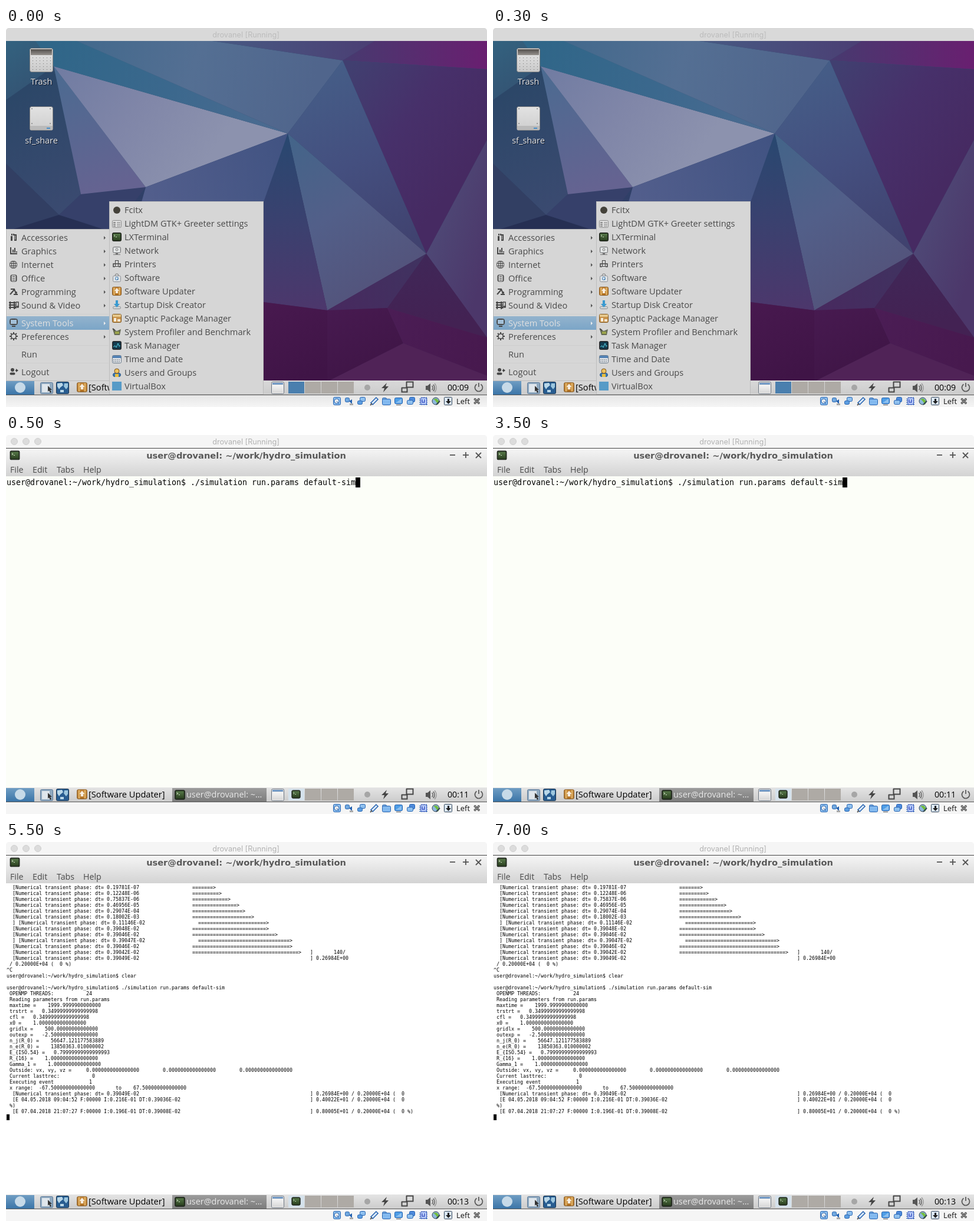
These frames come from a looping animation (816 by 643 pixels, 8000 ms). An HTML page with a canvas:

```html
<!DOCTYPE html>
<html lang="en">
<head>
<meta charset="utf-8">
<title>Desktop session</title>
<style>
  html, body { margin: 0; width: 100%; height: 100%; overflow: hidden; background: #fff; }
  canvas { display: block; }
</style>
</head>
<body>
<canvas id="stage" width="816" height="643"></canvas>
<script>
const ctx = document.getElementById('stage').getContext('2d');
const LOOP = 8000, TERMINAL_AT = 500, OUTPUT_AT = 5500;
const UI = '"Open Sans", "Noto Sans", sans-serif';
const HOST = 'drovanel';
const PROMPT = `user@${HOST}:~/work/hydro_simulation$ `;
const COMMAND = './simulation run.params default-sim';

// Drawing helpers
function rect(x, y, w, h, fill) {
  ctx.fillStyle = fill;
  ctx.fillRect(x, y, w, h);
}
function frame(x, y, w, h, color) {
  ctx.strokeStyle = color;
  ctx.lineWidth = 1;
  ctx.strokeRect(x + .5, y + .5, w - 1, h - 1);
}
function box(x, y, w, h, fill, edge, r = 2) {
  ctx.beginPath();
  ctx.roundRect(x + .5, y + .5, w - 1, h - 1, r);
  ctx.fillStyle = fill;
  ctx.fill();
  if (edge) {
    ctx.strokeStyle = edge;
    ctx.lineWidth = 1;
    ctx.stroke();
  }
}
function trace(pts) {
  ctx.beginPath();
  for (let i = 0; i < pts.length; i += 2) ctx.lineTo(pts[i], pts[i + 1]);
}
function poly(pts, fill) {
  trace(pts);
  ctx.closePath();
  ctx.fillStyle = fill;
  ctx.fill();
}
function line(pts, color, width = 1) {
  trace(pts);
  ctx.strokeStyle = color;
  ctx.lineWidth = width;
  ctx.stroke();
}
function disc(x, y, r, fill, edge) {
  ctx.beginPath();
  ctx.arc(x, y, r, 0, Math.PI * 2);
  if (fill) { ctx.fillStyle = fill; ctx.fill(); }
  if (edge) { ctx.strokeStyle = edge; ctx.lineWidth = 1; ctx.stroke(); }
}
function arc(x, y, r, a, b, color, width = 1) {
  ctx.beginPath();
  ctx.arc(x, y, r, a, b);
  ctx.strokeStyle = color;
  ctx.lineWidth = width;
  ctx.stroke();
}
function blend(x0, y0, x1, y1, ...colors) {
  const g = ctx.createLinearGradient(x0, y0, x1, y1);
  colors.forEach((c, i) => g.addColorStop(i / (colors.length - 1), c));
  return g;
}
const shade = (y0, y1, ...colors) => blend(0, y0, 0, y1, ...colors);
function text(s, x, y, color, { size = 14.6, align = 'left', family = UI, weight = 400 } = {}) {
  ctx.font = `${weight} ${size}px ${family}`;
  ctx.textAlign = align;
  ctx.fillStyle = color;
  ctx.fillText(s, x, y);
}
function mono(s, x, y, cell) {
  ctx.font = `${cell / .602}px "DejaVu Sans Mono", monospace`;
  ctx.textAlign = 'left';
  ctx.fillStyle = '#000';
  for (let i = 0; i < s.length; i++) if (s[i] !== ' ') ctx.fillText(s[i], x + i * cell, y);
}
function icon(draw, cx, cy, scale = 1) {
  ctx.save();
  ctx.translate(cx, cy);
  ctx.scale(scale, scale);
  draw();
  ctx.restore();
}

// Icons, centred on the origin
const DARK = '#464646', BLUE = '#2361b0', SKY = '#8fc0ee';

const glyph = {
  accessories() {
    rect(-5, -2, 3, 8, DARK); rect(-4, -6, 2, 3, DARK);
    rect(1, -5, 4, 11, DARK); rect(-1, -6, 2, 3, DARK); rect(2, -3, 1, 7, '#d6d6d6');
  },
  graphics() {
    line([-5, -6, -5, 5, 6, 5], DARK, 2);
    rect(-2, -2, 2, 5, DARK); rect(1, -5, 2, 8, DARK); rect(4, 1, 2, 2, DARK);
  },
  internet() {
    box(-7, -6, 13, 13, '#d6d6d6', DARK, 5);
    box(-4, -6, 7, 13, '#d6d6d6', DARK, 3);
    line([-.5, -6, -.5, 6], DARK);
    line([-6, -1.5, 5, -1.5], DARK); line([-6, 2.5, 5, 2.5], DARK);
  },
  office() {
    box(-6, -6, 12, 13, DARK, null, 3);
    box(-4, -5, 8, 11, '#d6d6d6', null, 1);
    for (const y of [-3, 0, 3]) rect(-2, y, 4, 1, DARK);
  },
  programming() {
    line([-6, 5, 1, -3], DARK, 2); line([-5, -4, 1, -4, 3, 1], DARK, 2);
    line([0, 5, 7, 5], DARK, 2); disc(4, 2, 2, DARK);
  },
  video() {
    for (const x of [-7, 0]) rect(x, -6, 2, 13, DARK);
    for (const y of [-5, -1, 3]) rect(-8, y, 11, 2, DARK);
    line([4, 4, 4, -5, 8, -5, 8, 3], DARK, 1.5);
    disc(3, 4, 2, DARK); disc(7, 3, 2, DARK);
  },
  system() {
    box(-7, -7, 14, 11, '#a3c0d8', DARK, 3); frame(-6, -6, 12, 9, DARK);
    rect(-3, 5, 6, 2, DARK);
  },
  preferences() {
    for (let i = 0; i < 8; i++) {
      const a = i * Math.PI / 4, c = Math.cos(a), s = Math.sin(a);
      line([c * 4, s * 4, c * 7, s * 7], DARK, 2);
    }
    disc(0, 0, 4.5, '#d6d6d6', DARK); disc(0, 0, 4, null, DARK);
  },
  logout() {
    disc(-2, -3, 3, DARK); box(-7, 1, 10, 5, DARK, null, 3);
    line([3, -2, 7, -2], DARK, 2); poly([4, -5, 8, -2, 4, 1], DARK);
  }
};

const app = {
  round() { disc(0, 0, 6, '#44423a'); },
  greeter() {
    box(-8, -6, 16, 13, '#e2e2e2', '#8a8a8a');
    for (const y of [-3, 0, 3]) { rect(-6, y, 4, 2, '#8c8c8c'); rect(0, y, 6, 2, '#aaa'); }
  },
  terminal() {
    box(-8, -8, 16, 15, '#273421', '#1b2018');
    rect(-6, -6, 12, 11, shade(-6, 5, '#567848', '#2b4120'));
    line([-5, -4, -3, -2.5, -5, -1], '#c5d5bb'); rect(-2, -1, 2, 1, '#c5d5bb');
  },
  network() {
    box(-7, -7, 14, 11, '#c9cdd0', '#777'); rect(-5, -5, 10, 7, '#e4e6e6');
    rect(-2, 4, 4, 2, '#777'); rect(-6, 6, 12, 1, '#777'); disc(0, -2, 2, null, '#777');
  },
  printer() {
    line([-3, 4, -6, 4, -6, -1, 6, -1, 6, 4, 3, 4], DARK, 1.5);
    frame(-3, -7, 6, 11, DARK);
  },
  store() {
    box(-7, -4, 14, 11, '#dfe2e5', '#8b8f94'); arc(0, -4, 3, Math.PI, 0, '#777');
    disc(0, 1, 3, '#5f92bd'); rect(-1, -1, 1, 4, '#fff'); rect(-2, 0, 4, 1, '#fff');
  },
  updater() {
    box(-8, -8, 16, 15, shade(-8, 7, '#c98a3c', '#b06f20'), '#87571d');
    rect(-6, -7, 3, 13, '#dbab60'); rect(3, -7, 3, 13, '#dbab60');
    poly([-4, -1, 0, -6, 4, -1, 2, -1, 2, 3, -2, 3, -2, -1], '#f7eee1');
  },
  disk() {
    box(-7, 2, 14, 5, '#cfd3d5', '#8d9194');
    poly([-2, -8, 2, -8, 2, -2, 5, -2, 0, 4, -5, -2, -2, -2], '#3a9ad0');
  },
  packages() {
    box(-8, -8, 16, 15, '#c8924a', '#80581f'); rect(-7, -7, 14, 4, '#e6c88c');
    rect(-5, -1, 4, 6, '#f5eddd'); rect(1, 1, 5, 4, '#f0e4cf');
  },
  profiler() {
    poly([-7, -5, 0, -2, 7, -5, 5, 5, -4, 5], '#666b54');
    rect(-3, -1, 7, 4, '#9ca54b'); line([-7, -6, -3, -3], '#444', 2);
  },
  tasks() {
    box(-8, -8, 16, 15, '#182630', '#333'); rect(-6, -6, 12, 11, '#153d51');
    line([-6, 2, -3, 0, -1, 3, 2, -4, 4, 1, 6, 0], '#55d1e3');
  },
  clock() {
    box(-8, -7, 16, 14, '#e4e6e9', '#68798a'); rect(-7, -6, 14, 4, '#5483b5');
    for (let i = 0; i < 8; i++) rect(-6 + i % 4 * 3, i < 4 ? 0 : 3, 2, 2, '#98a2ac');
  },
  users() {
    box(-7, 0, 14, 7, '#3679b8', '#214d80', 3);
    disc(0, -3, 4, '#edc15c', '#77501d'); rect(-3, 2, 6, 5, '#e9bd3a');
  },
  square() { rect(-8, -8, 16, 15, '#579bc7'); }
};

const SYSTEM_TOOLS = [
  ['Fcitx', 'round'], ['LightDM GTK+ Greeter settings', 'greeter'], ['LXTerminal', 'terminal'],
  ['Network', 'network'], ['Printers', 'printer'], ['Software', 'store'],
  ['Software Updater', 'updater'], ['Startup Disk Creator', 'disk'],
  ['Synaptic Package Manager', 'packages'], ['System Profiler and Benchmark', 'profiler'],
  ['Task Manager', 'tasks'], ['Time and Date', 'clock'], ['Users and Groups', 'users'],
  ['VirtualBox', 'square']
];
const MAIN_MENU = [
  ['Accessories', 'accessories', 356], ['Graphics', 'graphics', 379], ['Internet', 'internet', 402],
  ['Office', 'office', 425], ['Programming', 'programming', 448], ['Sound & Video', 'video', 471],
  ['System Tools', 'system', 501], ['Preferences', 'preferences', 524],
  ['Run', null, 554], ['Logout', 'logout', 584]
];

function wallpaper() {
  rect(0, 22, 816, 578, blend(0, 22, 120, 600, '#32607f', '#2f4068', '#452556'));
  const facets = [
    [[0, 22, 50, 22, 81, 65, 0, 122], blend(0, 22, 60, 110, '#33627f', '#345272')],
    [[0, 122, 81, 65, 127, 282, 90, 317, 0, 230], blend(0, 122, 90, 310, '#2c4768', '#3a4a70')],
    [[0, 230, 90, 317, 0, 345], '#323f63'],
    [[0, 345, 90, 317, 175, 345], '#262f53'],
    [[90, 317, 127, 282, 237, 270, 180, 345], '#36406a'],
    [[81, 65, 237, 270, 127, 282], blend(81, 65, 150, 280, '#4a6b91', '#656391')],
    [[81, 65, 478, 179, 237, 270], blend(90, 70, 330, 240, '#717ca2', '#8086a8', '#8c92ae')],
    [[50, 22, 120, 22, 478, 179, 81, 65], blend(70, 22, 478, 179, '#2f6688', '#3b688d', '#4d6b91')],
    [[120, 22, 350, 22, 571, 55, 478, 179], blend(120, 22, 510, 140, '#42698c', '#546f93', '#50658c')],
    [[350, 22, 625, 22, 571, 55], blend(350, 22, 620, 22, '#475a83', '#4b3f74')],
    [[625, 22, 816, 22, 816, 70, 571, 55], blend(580, 40, 816, 40, '#48396f', '#691f70')],
    [[571, 55, 816, 70, 816, 190, 713, 383], blend(580, 70, 790, 230, '#413f70', '#47306a', '#462a62')],
    [[571, 55, 713, 383, 478, 179], blend(540, 70, 680, 370, '#455d87', '#444f7f', '#40426f')],
    [[478, 179, 713, 383, 545, 479], blend(490, 190, 640, 430, '#446489', '#525f89', '#53547c')],
    [[478, 179, 545, 479, 437, 465, 437, 292], blend(478, 180, 490, 475, '#284870', '#3a416f', '#4c376c')],
    [[237, 270, 478, 179, 437, 295, 230, 295], blend(237, 270, 478, 190, '#525e8c', '#415382')],
    [[713, 383, 816, 190, 816, 525], blend(720, 370, 816, 400, '#4e4775', '#4c376a')],
    [[437, 465, 545, 479, 545, 600, 437, 600], blend(437, 465, 500, 600, '#48194f', '#3f1446')],
    [[545, 479, 713, 383, 647, 475], blend(560, 470, 700, 400, '#472a5f', '#403260')],
    [[713, 383, 816, 525, 647, 475], blend(713, 383, 720, 500, '#402758', '#432253')],
    [[545, 479, 647, 475, 674, 535, 545, 600], blend(545, 479, 600, 600, '#471a50', '#3f1546')],
    [[647, 475, 816, 525, 816, 590, 674, 535], blend(650, 480, 800, 580, '#4b1d55', '#47194e')],
    [[674, 535, 816, 590, 816, 600, 545, 600], '#502357']
  ];
  for (const [pts, fill] of facets) poly(pts, fill);
}

function desktopIcons() {
  box(40, 34, 40, 41, shade(34, 75, '#e6e6e6', '#c9c9c9'), '#858585', 3);
  rect(42, 36, 36, 10, shade(36, 46, '#54504d', '#94908c'));
  for (let i = 0; i < 30; i++) rect(45 + i % 6 * 6, 50 + Math.floor(i / 6) * 5, 1, 1, '#777');
  box(40, 133, 40, 41, shade(133, 174, '#e2e2e2', '#cecece'), '#858585', 3);
  rect(41, 166, 38, 7, '#bababa');
  rect(69, 169, 6, 2, '#468dc9');
  for (const [x, y] of [[44, 137], [75, 137], [44, 162], [75, 162]]) disc(x, y, 1, '#888');
  for (const [label, y] of [['Trash', 96], ['sf_share', 196]]) {
    const style = { size: 14.4, align: 'center' };
    text(label, 61, y + 1, '#101828', style);
    text(label, 60, y, '#e8e8e8', style);
  }
}

function menus() {
  const back = '#d6d6d6', ink = '#4a4a4a';
  rect(0, 341, 176, 258, back);
  frame(0, 341, 176, 258, '#bcbcbc');
  rect(1, 489, 174, 23, shade(489, 512, '#93b3cd', '#7ba5c7'));
  for (const y of [485, 538, 568]) rect(2, y, 172, 1, '#cecece');
  for (const [label, name, y] of MAIN_MENU) {
    const active = name === 'system';
    if (name) icon(glyph[name], 13, y - 1);
    text(label, 26, y + 5, active ? '#e0e0e0' : ink);
    if (y < 530) poly([166, y - 3, 169, y, 166, y + 3], active ? '#eee' : '#555');
  }
  rect(175, 294, 262, 328, back);
  frame(175, 294, 262, 328, '#bcbcbc');
  SYSTEM_TOOLS.forEach(([label, name], i) => {
    const y = 309 + 23 * i;
    icon(app[name], 188, y);
    text(label, 201, y + 5, ink);
  });
}

function tray(clock) {
  disc(613, 610, 5, '#a6a6a6');
  poly([646, 602, 637, 611, 642, 611, 640, 618, 649, 608, 644, 608], DARK);
  line([679, 600.5, 690.5, 600.5, 690.5, 609.5, 679.5, 609.5, 679.5, 600], DARK, 2);
  line([671, 610.5, 680.5, 610.5, 680.5, 617.5, 671.5, 617.5, 671.5, 610], DARK, 2);
  poly([712, 607, 715, 607, 720, 603, 720, 618, 715, 614, 712, 614], '#555');
  [4, 7, 10].forEach((r, i) => arc(719, 610.5, r + 1, -.75, .75, i < 2 ? '#555' : '#999', 1.4));
  text(clock, 749, 615, '#000', { size: 14.2, weight: 500 });
  arc(802, 610, 6.5, -1, Math.PI + 1, '#555', 1.7);
  line([802, 602, 802, 609], '#555', 1.7);
}

function panel(clock, open) {
  rect(0, 598, 816, 25, shade(598, 623, open ? '#e4e4e4' : '#d9d9d9', '#cbcbcb'));
  rect(0, 599, 48, 23, shade(599, 622, '#6f9dc3', '#3b75a8'));
  disc(24, 610, 9, '#c7dae8');

  box(58, 601, 22, 20, '#8fa9c0', '#5a7898');
  rect(61, 604, 13, 14, '#dfe6ec');
  poly([71, 607, 71, 617, 73, 615, 75, 619, 77, 618, 75, 614, 78, 614], '#333');
  box(85, 600, 22, 21, '#285d91', '#193550');
  poly([87, 603, 95, 602, 97, 606, 92, 610, 90, 613, 87, 608], '#b9d7e8');
  poly([99, 603, 105, 603, 105, 609, 102, 613, 98, 608], '#9cc6de');
  rect(92, 614, 6, 4, '#b9d7e8');

  icon(app.updater, 129, 610, 1.1);
  text('[Software Updater]', 140, 615, '#000', { weight: 500 });
  if (open) {
    rect(282, 599, 160, 23, shade(599, 622, '#9c9c9c', '#7c7c7c'));
    icon(app.terminal, 295, 611, 1.1);
    text(`user@${HOST}: ~...`, 306, 615, '#e9e9e9', { size: 14.4 });
  }
  box(450, 600, 22, 21, '#e9e9e9', '#6b7480');
  rect(452, 602, 18, 3, '#6c94c1');
  rect(452, 606, 18, 13, shade(606, 619, '#f4f4f4', '#d8d8d8'));
  for (let i = 0; i < 4; i++) rect(479 + i * 28, 600, 27, 20, '#aeaaa5');
  rect(479, 600, 27, 20, open ? '#d5e2ec' : '#4a7fae');
  if (open) icon(app.terminal, 492, 610, .95);
  tray(clock);
  rect(0, 622, 816, 1, '#555');
}

const status = [
  () => { box(-6, -7, 13, 14, SKY, BLUE); disc(0, 0, 4, '#eee', BLUE); line([0, 0, 4, 5], BLUE); },
  () => { box(-7, -6, 8, 8, '#72a9df', BLUE); poly([0, 0, 5, -3, 5, 5], BLUE); rect(1, 4, 6, 3, '#aaa'); },
  () => { box(-3, -7, 10, 8, SKY, BLUE); box(-7, -1, 9, 7, '#5d9ee0', BLUE); },
  () => { line([-5, 5, 5, -5], BLUE, 6); line([-4, 4, 4, -4], '#dceaf8', 3); line([-7, 7, -4, 4], '#555', 2); },
  () => { box(-7, -6, 8, 5, SKY, BLUE); box(-7, -4, 15, 11, '#83b9ef', BLUE); },
  () => { box(-7, -6, 14, 11, '#4e9de6', BLUE); poly([-5, 3, 5, -4, 5, 3], SKY); rect(-4, 6, 8, 1, '#555'); },
  () => { box(-3, -7, 10, 9, '#4e8bdc', BLUE); box(-7, -2, 11, 8, SKY, BLUE); },
  () => {
    for (const k of [-4, -1, 2, 5]) { rect(k, -7, 1, 14, BLUE); rect(-7, k, 14, 1, BLUE); }
    box(-5, -6, 11, 12, '#bcd2fa', '#4058c4'); line([-2, -3, -2, 2, 2, 2, 2, -3], '#4058c4', 1.5);
  },
  () => { disc(-1, 0, 6, '#8db7dc', '#345'); poly([-5, -4, 1, -4, 5, 1, 3, 6, -1, 0], '#72bd3c'); line([0, 6, 6, 0], '#345', 2); },
  () => { box(-7, -7, 14, 14, '#dbe8f8', '#345', 1); rect(-1, -4, 3, 4, '#222'); poly([-4, 0, 5, 0, .5, 5], '#222'); }
];

function hostWindow(open) {
  rect(0, 0, 816, 22, '#fff');
  ctx.beginPath();
  ctx.roundRect(0, 0, 816, 22, [5, 5, 0, 0]);
  ctx.fillStyle = open ? '#f5f5f5' : '#d9d9d9';
  ctx.fill();
  if (open) for (const x of [14, 34, 54]) disc(x, 11, 5.5, '#dcdcdc', '#cfcfcf');
  text(`${HOST} [Running]`, 407, 16, open ? '#b2b2b2' : '#bcbcbc',
    { size: 12.7, align: 'center', family: 'Inter, sans-serif' });
  rect(0, 623, 816, 20, open ? '#f5f5f5' : shade(623, 643, '#e6e6e6', '#f5f5f5'));
  const xs = [561, 582, 603, 625, 645, 666, 687, 708, 730, 750];
  status.forEach((draw, i) => icon(draw, xs[i], 633));
  text('Left', 764, 638, '#111', { size: 13 });
  text('⌘', 792, 638, '#111', { size: 13, family: '"DejaVu Sans", sans-serif' });
}

function terminalWindow(page) {
  rect(0, 22, 816, 48, shade(22, 70, '#f6f6f6', '#d3d3d3'));
  rect(0, 22, 816, 1, '#444');
  rect(0, 70, 816, 528, page);
  icon(app.terminal, 15, 35, 1.05);
  text(`user@${HOST}: ~/work/hydro_simulation`, 407.5, 40, '#585858',
    { align: 'center', weight: 700, family: '"DejaVu Sans", sans-serif' });
  line([753, 34, 762, 34], '#555', 1.8);
  line([775, 34, 785, 34], '#555', 1.8);
  line([780, 29, 780, 39], '#555', 1.8);
  line([797, 30, 806, 39], '#555', 1.8);
  line([806, 30, 797, 39], '#555', 1.8);
  [['File', 7], ['Edit', 45], ['Tabs', 86], ['Help', 131]]
    .forEach(([s, x]) => text(s, x, 64, '#4a4a4a', { size: 14.2 }));
}

const phase = (dt, lead = '  ') => `${lead}[Numerical transient phase: dt= ${dt}`;
const bar = n => '='.repeat(n - 1) + '>';
const tail = s => `] ${s} / 0.20000E+04 (  0`;
const ZERO = '0.0000000000000000', ONE = '1.0000000000000000', GAP = '        ';

// Each row: text, then optional pairs of column and text
const OUTPUT = [
  [phase('0.19781E-07'), 63, bar(8)],
  [phase('0.12248E-06'), 63, bar(10)],
  [phase('0.75837E-06'), 63, bar(13)],
  [phase('0.46956E-05'), 63, bar(16)],
  [phase('0.29074E-04'), 63, bar(18)],
  [phase('0.18002E-03'), 63, bar(21)],
  [phase('0.11146E-02', '  ] '), 65, bar(24)],
  [phase('0.39048E-02'), 63, bar(26)],
  [phase('0.39046E-02'), 63, bar(29)],
  [phase('0.39047E-02', '  ] '), 65, bar(32)],
  [phase('0.39046E-02'), 63, bar(34)],
  [phase('0.39042E-02'), 63, bar(37), 103, ']', 111, '140/'],
  [phase('0.39049E-02'), 103, '] 0.26984E+00'],
  [' / 0.20000E+04 (  0 %)'],
  ['^C'],
  [PROMPT + 'clear'],
  [''],
  [PROMPT + COMMAND],
  [' OPENMP THREADS:', 27, '24'],
  [' Reading parameters from run.params'],
  [' maxtime =    1999.9999900000000'],
  [' trstrt =   0.34999999999999998'],
  [' cfl =   0.34999999999999998'],
  [' x0 =    ' + ONE],
  [' gridlx =    500.00000000000000'],
  [' outexp =   -2.5000000000000000'],
  [' n_j(R_0) =    56647.121177583889'],
  [' n_e(R_0) =    13850363.010000002'],
  [' E_{ISO.54} =   0.79999999999999993'],
  [' R_{16} =    ' + ONE],
  [' Gamma_1 =    ' + ONE],
  [' Outside: vx, vy, vz =     ' + [ZERO, ZERO, ZERO].join(GAP)],
  [' Current lasttrec:', 29, '0'],
  [' Executing event', 28, '1'],
  [' x range:  -67.500000000000000', 37, 'to', 43, '67.500000000000000'],
  [phase('0.39049E-02'), 103, tail('0.26984E+00')],
  ['  [E 04.05.2018 09:04:52 F:00000 I:0.216E-01 DT:0.39036E-02', 103, tail('0.40022E+01')],
  [' %)'],
  ['  [E 07.04.2018 21:07:27 F:00000 I:0.196E-01 DT:0.39008E-02', 103, tail('0.80005E+01') + ' %)']
];

function desktopScene() {
  wallpaper();
  desktopIcons();
  panel('00:09', false);
  menus();
  hostWindow(false);
}
function commandScene() {
  hostWindow(true);
  terminalWindow('#fcfef8');
  const typed = PROMPT + COMMAND;
  mono(typed, 1, 85, 8);
  rect(1 + typed.length * 8, 72, 8, 17, '#000');
  panel('00:11', true);
}
function outputScene() {
  hostWindow(true);
  terminalWindow('#fff');
  OUTPUT.forEach(([first, ...rest], row) => {
    const y = 80 + row * 10;
    mono(first, 1, y, 5);
    for (let i = 0; i < rest.length; i += 2) mono(rest[i + 1], 1 + rest[i] * 5, y, 5);
  });
  rect(1, 72 + OUTPUT.length * 10, 5, 10, '#000');
  panel('00:13', true);
}

const start = performance.now();
function tick() {
  const t = (performance.now() - start) % LOOP;
  if (t < TERMINAL_AT) desktopScene();
  else if (t < OUTPUT_AT) commandScene();
  else outputScene();
  requestAnimationFrame(tick);
}
tick();
</script>
</body>
</html>
```
